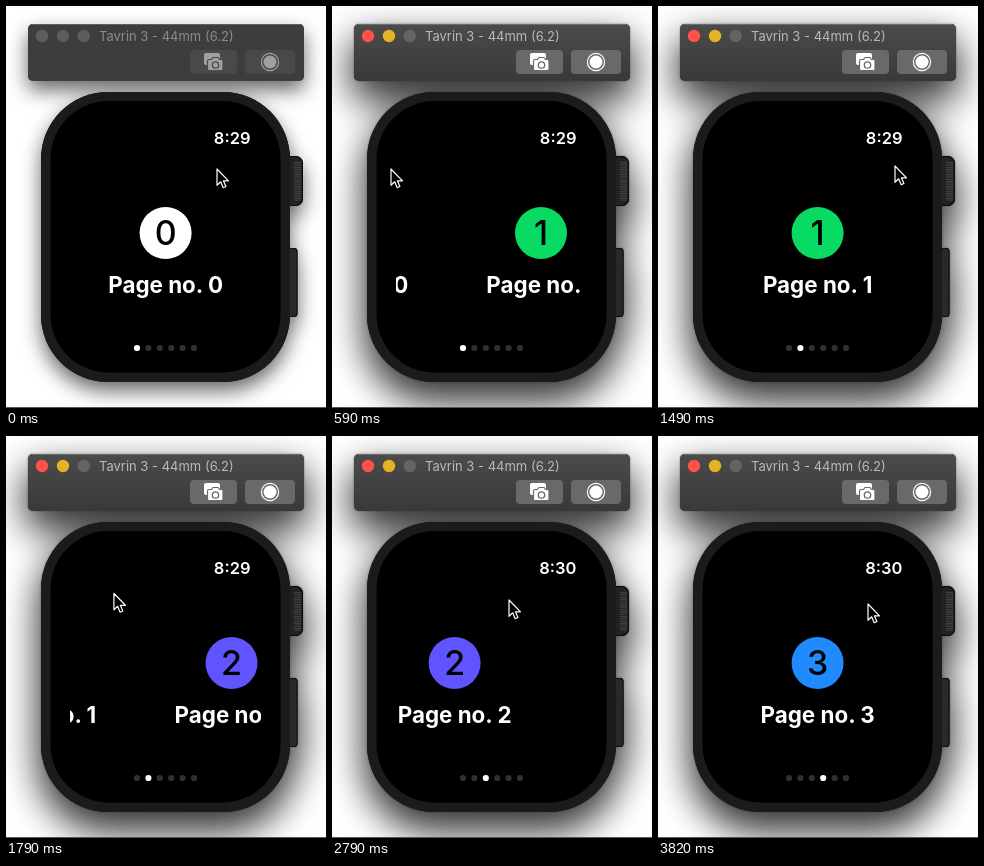
An HTML page for the animation above (3850 ms loop, 320x402 px).

```html
<!DOCTYPE html>
<html lang="en">
<head>
<meta charset="utf-8">
<style>
html, body { margin: 0; width: 100%; height: 100%; overflow: hidden; background: #fff }
svg { display: block; width: 320px; height: 402px; font-family: Inter, Roboto, sans-serif;
  --bar: #3d3d3d; --btn: #494949; --ink: #a0a0a0; --title: #8b8b8b; --red: #5d5d5d; --yellow: #5d5d5d; --grey: #5d5d5d }
svg.active { --bar: url(#barFill); --btn: #696969; --ink: #fff; --title: #b9b9b9; --red: #ff5149; --yellow: #e5b224; --grey: #646464 }
#shadow { filter: drop-shadow(0 9px 10px #0009) }
.active #shadow { filter: drop-shadow(0 17px 19px #000b) drop-shadow(0 0 1px #0006) }
.page { text-anchor: middle }
.digit { font-size: 34px; font-weight: 500 }
.label { font-size: 22.4px; font-weight: 700; fill: #fff }
</style>
</head>
<body>
<svg id="stage" viewBox="0 0 320 402">
  <defs>
    <linearGradient id="barFill" x2="0" y2="1">
      <stop stop-color="#4b4b4b"/><stop offset="1" stop-color="#393939"/>
    </linearGradient>
    <clipPath id="screen"><path d="M64 95H255V366H64Z"/></clipPath>
    <pattern id="ribs" width="8" height="2.4" patternUnits="userSpaceOnUse">
      <path d="M0 .6H8" stroke="#4a4a4a" stroke-width="1"/>
    </pattern>
  </defs>

  <g id="shadow">
    <rect x="22" y="18" width="276" height="57" rx="5" fill="#3d3d3d"/>
    <rect x="35" y="86" width="249" height="290" rx="67" fill="#1b1b1b"/>
    <rect x="279" y="150" width="18" height="50" rx="7"/>
    <rect x="281" y="242" width="10.5" height="69" rx="3"/>
  </g>
  <path d="M0 401.5H320" stroke="#555"/>

  <!-- Title bar -->
  <rect x="22" y="18" width="276" height="57" rx="5" fill="var(--bar)"/>
  <path d="M26 18.5H294" stroke="#fff" stroke-opacity=".18"/>
  <circle cx="36" cy="30" r="6.2" fill="var(--red)"/>
  <circle cx="57" cy="30" r="6.2" fill="var(--yellow)"/>
  <circle cx="77.7" cy="30" r="6.2" fill="var(--grey)"/>
  <text x="93" y="35" font-size="13" fill="var(--title)">Tavrin 3 - 44mm (6.2)</text>
  <g fill="var(--btn)">
    <rect x="184" y="44" width="47" height="24" rx="4"/>
    <rect x="239" y="44" width="50" height="24" rx="4"/>
  </g>
  <g fill="var(--ink)">
    <rect x="198" y="47" width="16" height="12" rx="2"/>
    <path d="M203 53.5h2.5l1.5-2h5l1.5 2h2q1.5 0 1.5 1.5v8q0 1.5-1.5 1.5h-12.5q-1.5 0-1.5-1.5v-8q0-1.5 1.5-1.5Z" stroke="var(--btn)" stroke-width="1.2"/>
    <circle cx="209.5" cy="59" r="3.2" fill="none" stroke="var(--btn)" stroke-width="1.3"/>
    <circle cx="264" cy="56" r="6.5"/>
    <circle cx="264" cy="56" r="8.6" fill="none" stroke="var(--ink)" stroke-width="1.2"/>
  </g>

  <!-- Watch -->
  <rect x="279.5" y="150.5" width="17" height="49" rx="7" fill="#222" stroke="#0b0b0b"/>
  <rect x="288" y="155" width="7" height="40" rx="2" fill="url(#ribs)"/>
  <rect x="281.5" y="242.5" width="9.5" height="68" rx="3" fill="#292929" stroke="#111"/>
  <rect x="35" y="86" width="249" height="290" rx="67" fill="#1b1b1b"/>
  <rect x="44.5" y="95" width="230" height="271.5" rx="58"/>
  <text id="clock" x="244.5" y="138" font-size="16.5" font-weight="600" fill="#fff" text-anchor="end"></text>
  <g clip-path="url(#screen)"><g id="pages"></g></g>
  <g id="dots" fill="#fff"></g>

  <path id="pointer" d="M0 0V16.3L3.7 12.8L6.2 18.7L8.9 17.5L6.4 11.8H11.5Z" stroke="#fff" stroke-width="1.2" stroke-linejoin="round"/>
</svg>
<script>
const $ = id => document.getElementById(id);
const LOOP = 3850, PAGE = 190, MID = 159.6;

// Keys are [ms, value]
const scroll = [[300, 0], [590, 140.6], [660, 162], [900, 190], [1560, 190], [1680, 230],
  [1800, 320], [1900, 362], [2080, 380], [2700, 380], [2790, 417], [3050, 524.6], [3150, 556], [3380, 570]];
const dot = [[640, 0], [740, 1], [1880, 1], [1980, 2], [3010, 2], [3130, 3]];
const pointerX = [[0, 211], [20, 209.5], [250, 209.5], [590, 59], [680, 52], [760, 52], [1250, 237],
  [1500, 237], [1660, 196], [1850, 84], [1950, 80], [2090, 93], [2540, 225], [2680, 224],
  [2790, 177], [2980, 95], [3050, 91], [3130, 91], [3700, 210]];
const pointerY = [[0, 163], [20, 162.5], [590, 163], [760, 165], [1490, 160], [2090, 156], [2790, 164], [3050, 161], [3750, 168]];

// Monotone cubic through the keys
function at(keys, t) {
  const last = keys.length - 1;
  if (t <= keys[0][0]) return keys[0][1];
  if (t >= keys[last][0]) return keys[last][1];
  const i = keys.findIndex(k => k[0] > t) - 1;
  const slope = j => (keys[j + 1][1] - keys[j][1]) / (keys[j + 1][0] - keys[j][0]);
  const tangent = j => {
    if (j < 1 || j >= last) return 0;
    const a = slope(j - 1), b = slope(j);
    return a * b > 0 ? 2 * a * b / (a + b) : 0;
  };
  const [t0, v0] = keys[i], [t1, v1] = keys[i + 1], h = t1 - t0, u = (t - t0) / h, w = 1 - u;
  return v0 * w * w * (1 + 2 * u) + v1 * u * u * (3 - 2 * u) + h * u * w * (tangent(i) * w - tangent(i + 1) * u);
}

$('pages').innerHTML = ['#fff', '#08da64', '#6054ff', '#1f8bff'].map((color, i) =>
  `<g class="page" transform="translate(${MID + i * PAGE})"><circle cy="227" r="26" fill="${color}"/>
   <text class="digit" y="239.3">${i}</text><text class="label" y="287">Page no. ${i}</text></g>`).join('');
$('dots').innerHTML = [...Array(6).keys()].map(i => `<circle cx="${131 + i * 11.4}" cy="342" r="3.1"/>`).join('');

function draw(now) {
  const t = now % LOOP, current = at(dot, t);
  $('stage').classList.toggle('active', t >= 250);
  $('clock').textContent = t < 2400 ? '8:29' : '8:30';
  $('pages').setAttribute('transform', `translate(${-at(scroll, t)})`);
  [...$('dots').children].forEach((c, i) =>
    c.setAttribute('opacity', .19 + .81 * Math.max(0, 1 - Math.abs(i - current))));
  $('pointer').setAttribute('transform', `translate(${at(pointerX, t)} ${at(pointerY, t)})`);
}

let start;
function tick(now) {
  start ??= now;
  draw(now - start);
  requestAnimationFrame(tick);
}
draw(0);
requestAnimationFrame(tick);
</script>
</body>
</html>
```
